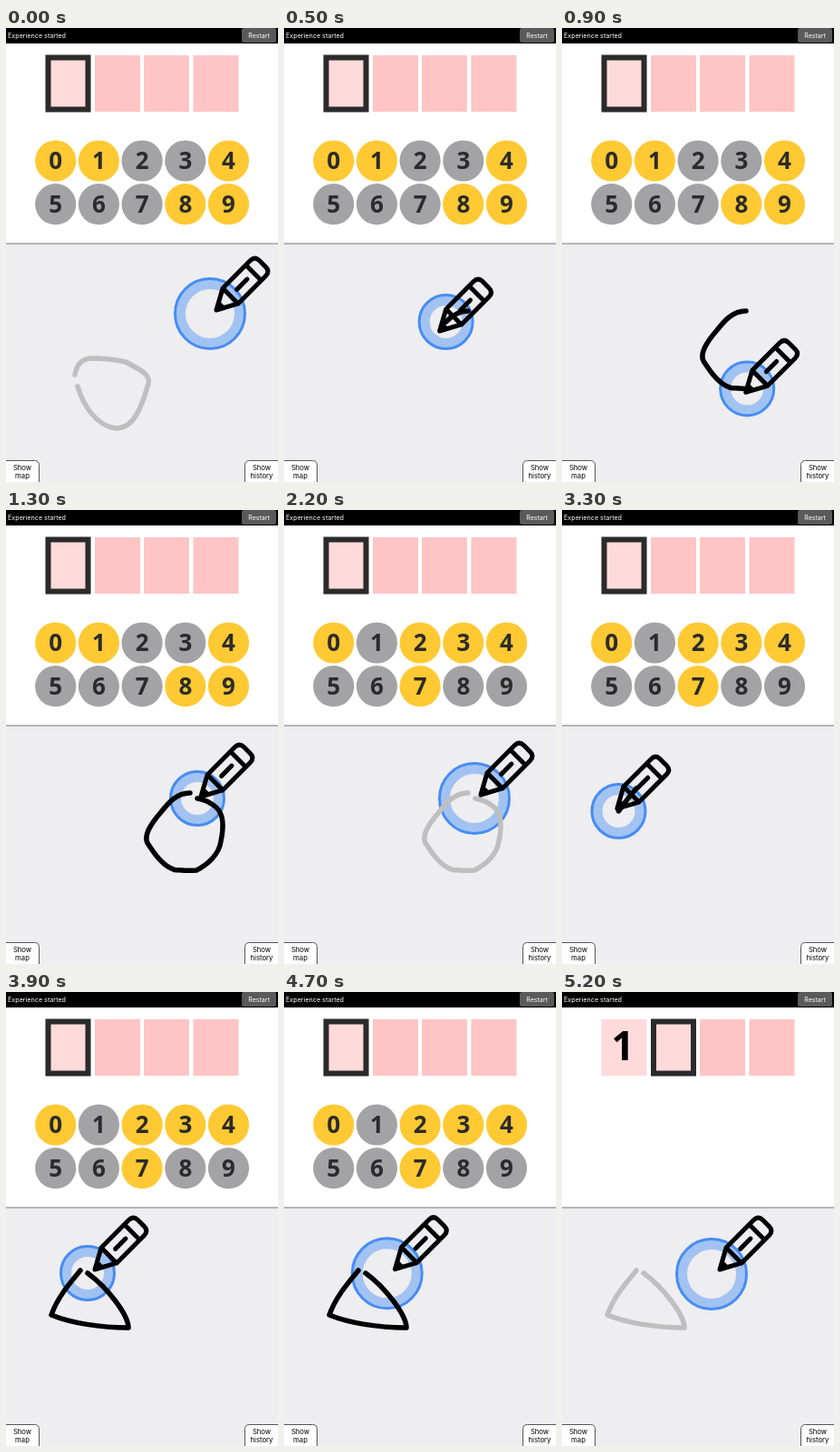
An HTML page that plays this animation: 300x499 px, repeating every 6200 ms.

```html
<!DOCTYPE html>
<html lang="en">
<head>
<meta charset="utf-8">
<title>Drawing PIN</title>
<style>
  html, body { margin: 0; width: 100%; height: 100%; overflow: hidden; background: #fff; }
  svg { display: block; width: 100%; height: 100%; }
  text { text-anchor: middle; font-family: Inter, Roboto, sans-serif; }
  .digit { font: 700 26px "Open Sans", "Noto Sans", sans-serif; fill: #2b2b2b; }
  .entry { font: 700 44px "Open Sans", "Noto Sans", sans-serif; fill: #000; }
  .ink, .pencil { fill: none; stroke-linecap: round; stroke-linejoin: round; }
  .ink { stroke-width: 5.5; }
  .pencil { stroke: #000; stroke-width: 5; }
  .tab { fill: #fff; stroke: #555; }
</style>
</head>
<body>
<svg viewBox="0 0 300 499" id="stage">
  <rect width="300" height="499" fill="#fff"/>
  <rect width="300" height="17"/>
  <text x="2" y="10.8" font-size="7.2" fill="#fff" style="text-anchor:start">Experience started</text>
  <rect x="260" y="0" width="38" height="16" rx="2.5" fill="#5a5a5a"/>
  <text x="279" y="10.6" font-size="7" fill="#fff">Restart</text>
  <g id="cells"></g>
  <rect id="cursor" y="32.5" width="44" height="57" fill="none" stroke="#2b2b2b" stroke-width="6"/>
  <text id="entry" class="entry" x="67" y="75">1</text>
  <g id="keypad"></g>
  <rect y="237" width="300" height="262" fill="#eeedef"/>
  <rect y="236.5" width="300" height="1" fill="#777"/>
  <circle id="ring" fill="none" stroke="#3c8cf5" stroke-opacity=".43" stroke-width="12"/>
  <circle id="rim" fill="none" stroke="#468df2" stroke-width="3"/>
  <g id="inks"></g>
  <g id="pencil" class="pencil">
    <path d="M0 0 22-12H65Q72-12 72-5V5Q72 12 65 12H22ZM22-12V12M58-12V12M32 0H48"/>
    <path d="M0 0 9-5V5Z" fill="#000" stroke-width="1"/>
  </g>
  <path class="tab" d="M-1 500V475.5H31.5Q36.5 475.5 36.5 480.5V500Z"/>
  <path class="tab" d="M263.5 500V480.5Q263.5 475.5 268.5 475.5H301V500Z"/>
  <g font-size="7.7">
    <text x="18" y="486">Show</text><text x="18" y="495">map</text>
    <text x="282" y="486">Show</text><text x="282" y="495">history</text>
  </g>
</svg>
<script>
const $ = id => document.getElementById(id);

function add(parent, tag, attrs, text = '') {
  const el = document.createElementNS('http://www.w3.org/2000/svg', tag);
  set(el, attrs);
  el.textContent = text;
  return parent.appendChild(el);
}

function set(el, attrs) {
  for (const name in attrs) el.setAttribute(name, attrs[name]);
}

const cells = [43.5, 98, 152, 206.5].map(x =>
  add($('cells'), 'rect', { x, y: 30, width: 50, height: 62 }));

const keys = Array.from({ length: 10 }, (_, n) => {
  const x = 54.7 + n % 5 * 47.7, y = n < 5 ? 146 : 193.7;
  const disc = add($('keypad'), 'circle', { cx: x, cy: y, r: 22.6 });
  add($('keypad'), 'text', { x, y: y + 9.3, class: 'digit' }, n);
  return disc;
});

// Each stroke is drawn from start to end, fades to grey at settle and is removed at clear.
const strokes = [
  { start: -2, end: -1, settle: 0, clear: 400,
    d: 'M79 394C85 414 99 437 121 440C142 440 150 415 157 391C160 380 146 375 132 367C118 364 102 363 94 363C82 364 78 371 76 381' },
  { start: 400, end: 1300, settle: 2200, clear: 3200,
    d: 'M203 311C188 311 179 322 171 332C158 347 152 358 156 366C165 380 174 392 186 395.5C194 396 202 397 210 396C222 390 235 379 237 364C240 350 241 335 232 327C225 321 218 318 211 317' },
  { start: 3200, end: 3900, settle: 5000, clear: 6200,
    d: 'M82 306C72 318 57 335 50 355C72 364 105 369 135 369C135 355 112 325 90 309' }
];
for (const s of strokes) {
  s.path = add($('inks'), 'path', { d: s.d, class: 'ink' });
  s.length = s.path.getTotalLength();
}

const HALO = [[0, 225, 314], [400, 203, 311], [1300, 212, 317], [2200, 210, 317],
  [2800, 120, 297], [3200, 82, 306], [3900, 90, 309], [4400, 90, 309], [5200, 165, 310]];
const RADIUS = [[0, 39], [200, 39], [400, 30], [1300, 30], [1500, 39],
  [3000, 39], [3200, 30], [3900, 30], [4100, 39]];
const TIP = [[0, 5, -2], [500, -9, 12], [1300, 2, 0], [2200, 5, -2],
  [2800, -11, 0], [3900, 6, -2], [5200, 7, -3]];

function tween(track, t) {
  const next = track.findIndex(key => key[0] > t);
  if (next < 0) return track.at(-1).slice(1);
  const from = track[next - 1], to = track[next];
  const p = (t - from[0]) / (to[0] - from[0]), eased = p * p * (3 - 2 * p);
  return from.slice(1).map((v, i) => v + (to[i + 1] - v) * eased);
}

function render(t) {
  let [x, y] = tween(HALO, t);
  for (const s of strokes) {
    const visible = t >= s.start && t < s.clear;
    const drawn = s.length * Math.min(1, Math.max(0, (t - s.start) / (s.end - s.start)));
    set(s.path, {
      visibility: visible ? 'visible' : 'hidden',
      stroke: t >= s.settle ? '#bfbfbf' : '#000',
      'stroke-dasharray': `${drawn} 999`
    });
    if (t >= s.start && t <= s.end) ({ x, y } = s.path.getPointAtLength(drawn));
  }

  const [r] = tween(RADIUS, t), [dx, dy] = tween(TIP, t);
  set($('ring'), { cx: x, cy: y, r: r - 6 });
  set($('rim'), { cx: x, cy: y, r: r - .5 });
  set($('pencil'), { transform: `translate(${x + dx + 2} ${y + dy - 2}) rotate(-45)` });

  const accepted = t >= 5000, active = accepted ? 1 : 0;
  cells.forEach((cell, i) => set(cell, { fill: i <= active ? '#ffdada' : '#ffc4c4' }));
  set($('cursor'), { x: accepted ? 101 : 46.5 });
  set($('entry'), { visibility: accepted ? 'visible' : 'hidden' });
  set($('keypad'), { visibility: accepted ? 'hidden' : 'visible' });
  const yellow = t < 2200 ? '01489' : '02347';
  keys.forEach((disc, n) => set(disc, { fill: yellow.includes(n) ? '#ffc933' : '#a3a2a4' }));
}

const origin = performance.now();
function frame() {
  const t = (performance.now() - origin) % 6200;
  render(Math.min(5200, Math.floor(t / 100) * 100));
  requestAnimationFrame(frame);
}
frame();
</script>
</body>
</html>
```
